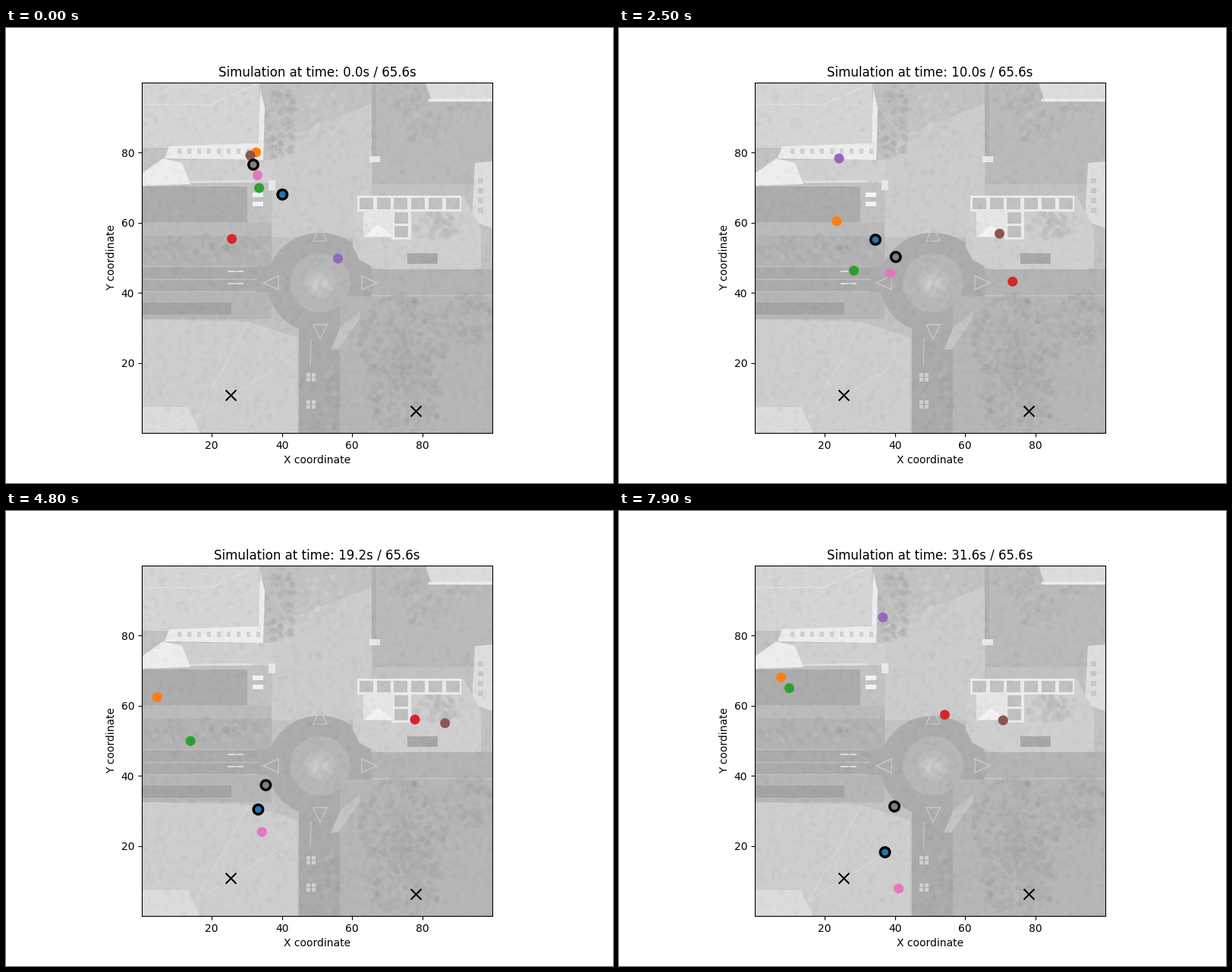
A matplotlib script for the animation above (8000 ms loop, 800 px wide and 600 px high).

```python
import numpy as np
import matplotlib.pyplot as plt
from matplotlib.animation import FuncAnimation

FRAMES, STEP, TOTAL = 80, 0.4, 65.6
LOW, HIGH = 0.1, 99.9
LEFT, BASE, SIDE = 179, 534, 462  # map square in stage pixels
HUB = np.array([414, 336])  # centre of the roundabout

rng = np.random.default_rng(4)
fig, ax = plt.subplots(figsize=(8, 6), dpi=100)
ax.set(aspect="equal", xlabel="X coordinate", ylabel="Y coordinate",
       xticks=range(20, 100, 20), yticks=range(20, 100, 20))


def units(pts):
    """Stage pixels to map coordinates."""
    p = np.asarray(pts, float)
    k = (HIGH - LOW) / SIDE
    return LOW + (p[..., 0] - LEFT) * k, LOW + (BASE - p[..., 1]) * k


def poly(g, *pts):
    return ax.fill(*units(pts), color=str(g / 255), lw=0, zorder=0)[0]


def rect(g, x, y, w, h):
    return poly(g, (x, y), (x + w, y), (x + w, y + h), (x, y + h))


def line(g, w, *pts):
    return ax.plot(*units(pts), color=str(g / 255), lw=w, zorder=0)[0]


def disc(g, rx, ry):
    a = np.linspace(0, 2 * np.pi, 60)
    poly(g, *(HUB + np.c_[rx * np.cos(a), ry * np.sin(a)]))


def leaves(g, x, y, rx, ry):
    """Canopy of soft dots, as dense as its area asks for."""
    n = int(rx * ry / 8)
    r, a = np.sqrt(rng.random(n)), rng.random(n) * 2 * np.pi
    pts = np.c_[x + rx * r * np.cos(a), y + ry * r * np.sin(a)]
    shades = np.repeat(rng.normal(g, 8, (n, 1)) / 255, 3, axis=1)
    ax.scatter(*units(pts), s=rng.uniform(8, 45, n), c=shades, lw=0, alpha=0.35, zorder=0)


def hatch(g, area, slope, gap):
    """Fine parallel strokes inside a roof."""
    pts = []
    for y in range(-400, 1000, gap):
        pts += [(150, y), (650, y + slope * 500), (np.nan, np.nan)]
    line(g, 0.5, *pts).set_clip_path(area)


def draw_left_block():
    leaves(180, 362, 125, 22, 50)
    hatch(218, rect(212, LEFT, 72, 155, 86), -0.12, 4)
    line(224, 1, (LEFT, 101), (270, 101), (332, 73))
    poly(237, (209, 172), (215, 156), (333, 152), (335, 80), (341, 105), (339, 174))
    for x in range(226, 336, 13):
        rect(208, x, 159, 5, 7)
    rect(208, 217, 174, 135, 30)
    poly(238, (LEFT, 192), (207, 172), (232, 178), (243, 206), (LEFT, 208))
    line(224, 2, (243, 203), (326, 202))
    rect(172, LEFT, 209, 139, 47)
    rect(187, LEFT, 256, 171, 18)
    rect(179, LEFT, 274, 171, 40)
    leaves(178, 265, 291, 85, 18)
    for y in (217, 229):
        rect(242, 325, y, 14, 6)
    rect(232, 346, 201, 9, 13)


def draw_gardens():
    leaves(200, 415, 116, 34, 34)
    rect(186, 483, 72, 158, 134)
    rect(177, 482, 72, 6, 100)
    for x in (520, 555, 610):
        leaves(182, x, 130 + rng.uniform(-40, 50), 28, 24)
    poly(220, (553, 72), (641, 72), (641, 97), (561, 97))
    line(236, 3, (559, 95), (641, 95))
    rect(234, 479, 169, 14, 8)
    poly(222, (618, 178), (641, 176), (641, 264), (614, 254))
    for y in range(198, 244, 13):
        rect(200, 622, y, 7, 7)


def draw_pavilion():
    poly(207, (457, 260), (465, 222), (604, 222), (626, 264), (626, 318),
         (490, 318), (466, 306), (457, 288))
    rect(168, 529, 297, 40, 14)
    leaves(186, 564, 260, 30, 18)
    rect(235, 463, 221, 137, 21)
    rect(235, 508, 240, 26, 39)
    rect(230, 471, 240, 39, 36)
    poly(243, (472, 275), (490, 260), (510, 275))
    for x, y in [(466 + 22.7 * i, 224) for i in range(6)] + [(512, 243), (512, 261)]:
        rect(193, x, y, 18, 15)


def draw_roads():
    rect(171, LEFT, 314, 235, 34)
    rect(180, HUB[0], 318, 227, 34)
    rect(182, LEFT, 348, 171, 36)
    rect(164, LEFT, 362, 118, 16)
    rect(170, 386, 336, 54, 198)
    disc(172, 70, 66)
    disc(182, 40, 39)
    disc(188, 21, 20)
    leaves(205, *HUB, 15, 13)
    island = np.array([(55, -9), (55, 9), (75, 0), (55, -9)])
    for turn in range(4):
        c, s = np.cos(turn * np.pi / 2), np.sin(turn * np.pi / 2)
        line(202, 1, *(HUB + island @ np.array([(c, s), (-s, c)])))
    for y in (314, 331, 347):
        line(193, 1, (LEFT, y), (330, y))
    line(196, 1, (402, 410), (401, 446))
    for x in (293, 304):
        for y in (321, 337):
            line(220, 1.5, (x, y), (x + 8, y))


def draw_lower():
    roof = poly(205, (LEFT, 384), (318, 387), (384, 408), (384, BASE), (LEFT, BASE))
    hatch(211, roof, 0.55, 5)
    line(215, 1, (320, 388), (250, 514), (382, 432))
    poly(220, (LEFT, 500), (240, 500), (256, BASE), (LEFT, BASE))
    rect(182, 440, 354, 201, 180)
    poly(196, (428, 424), (440, 396), (466, 373), (466, 384), (438, 424))
    for x, y, r in ((525, 410, 60), (525, 480, 54), (610, 384, 34)):
        leaves(173, x, y, r, r)
    leaves(173, 428, 488, 10, 44)
    for x in (396, 403):
        for y in (455, 461, 491, 497):
            rect(208, x, y, 5, 5)


def draw_grain():
    n = rng.normal(0, 1, (231, 231))
    soft = sum(np.roll(n, (i, j), (0, 1)) for i in range(3) for j in range(3)) / 3
    rgba = np.zeros((231, 231, 4))
    rgba[..., :3] = (soft > 0)[..., None]
    rgba[..., 3] = np.abs(soft) * 0.015
    ax.imshow(rgba, extent=(LOW, HIGH, LOW, HIGH), zorder=0.5)


rect(194, LEFT, 72, SIDE, SIDE)
poly(204, (352, 150), (482, 100), (482, 222), (458, 276), (350, 276))
draw_left_block()
draw_gardens()
draw_roads()
draw_pavilion()
draw_lower()
draw_grain()

KEYS = np.array([0, 15, 25, 33, 48, 68, 79])


def track(*pts):
    """Smooth path through the places reached at KEYS, one row per frame."""
    p = np.array(pts, float)
    h = np.diff(KEYS)[:, None]
    d = np.diff(p, axis=0) / h
    m = np.empty_like(p)
    m[1:-1] = (h[1:] * d[:-1] + h[:-1] * d[1:]) / (h[1:] + h[:-1])
    m[0], m[-1] = 1.5 * d[0] - 0.5 * m[1], 1.5 * d[-1] - 0.5 * m[-2]
    f = np.arange(FRAMES)
    i = np.clip(np.searchsorted(KEYS, f, "right") - 1, 0, len(h) - 1)
    w = h[i]
    u = (f - KEYS[i])[:, None] / w
    q = ((1 + 2 * u) * (1 - u) ** 2 * p[i] + u * (1 - u) ** 2 * w * m[i]
         + u * u * (3 - 2 * u) * p[i + 1] - u * u * (1 - u) * w * m[i + 1])
    return np.c_[units(q)]


blue = track((364.3, 219.6), (349.5, 237.2), (338, 279.2), (343.5, 326),
             (332.4, 393.6), (339, 439.5), (350.6, 450))
orange = track((329.7, 164), (323.4, 241.2), (287, 254.8), (249.4, 249.2),
               (199.2, 245.6), (200, 224.8), (213.5, 219.4))
green = track((333.7, 211), (345.6, 287.8), (309.6, 320), (279.6, 328),
              (243.2, 303.3), (219, 274.1), (224.4, 233.6))
red = track((297.7, 278.2), (447, 320.8), (518.8, 334.4), (548.2, 314.2),
            (539, 275), (473.7, 270.3), (429.4, 268.7))
purple = track((437.4, 304.1), (315.5, 258.8), (290, 172), (315.3, 98.9),
               (332, 50), (338.5, 114.2), (347.8, 140.2))
brown = track((322, 168), (393.8, 275.8), (501.5, 271.2), (572.5, 279),
              (578.6, 279.8), (545.7, 276.8), (506.2, 276))
pink = track((331.6, 194.2), (350.4, 275.4), (357.8, 323.7), (351.3, 359.3),
             (337.2, 423.2), (339, 489.5), (368.7, 498))
grey = track((326, 180.2), (356.7, 258.7), (364.8, 301.9), (347.4, 327.2),
             (342.4, 361.5), (344.3, 388.3), (363, 389.6))
paths = np.stack([blue, orange, green, red, purple, brown, pink, grey], axis=1)

colors = [f"C{i}" for i in range(8)]
agents = ax.scatter(*paths[0].T, s=80, c=colors, zorder=2.2,
                    edgecolors=["black"] + colors[1:7] + ["black"],
                    linewidths=[2.5] + [0.4] * 6 + [2.5])
ax.scatter(*units([(296, 484), (540, 505)]), s=100, c="black", marker="x", zorder=2.1)
title = ax.set_title("")
ax.set(xlim=(LOW, HIGH), ylim=(LOW, HIGH))


def update(i):
    agents.set_offsets(paths[i])
    title.set_text(f"Simulation at time: {i * STEP:.1f}s / {TOTAL}s")
    return agents, title


anim = FuncAnimation(fig, update, frames=FRAMES, interval=100, repeat=True, repeat_delay=0)
plt.show()
```
